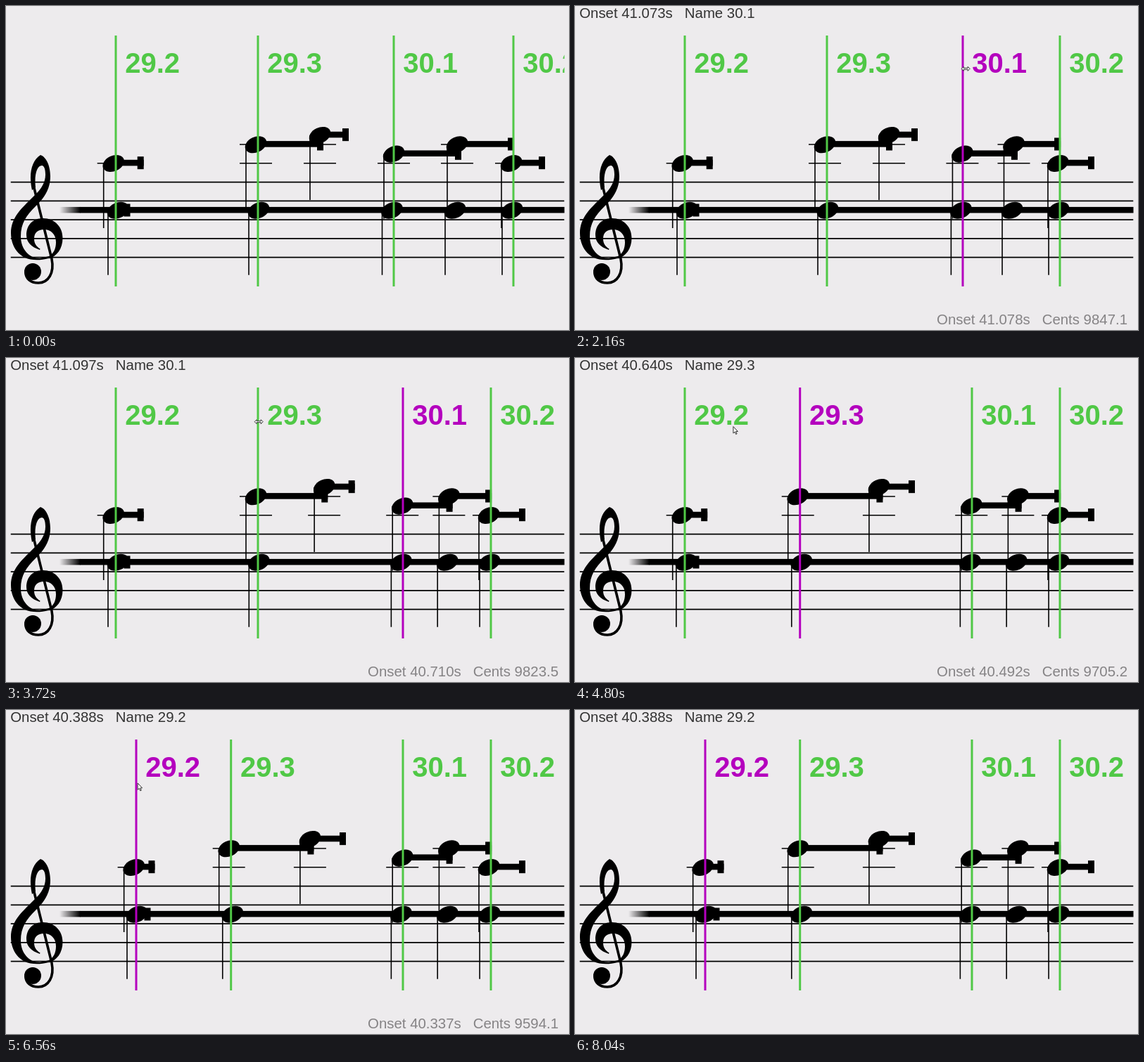
An HTML page that plays this animation: 800 by 461 pixels, repeating every 8080 ms.

```html
<!DOCTYPE html>
<html lang="en">
<head>
<meta charset="utf-8">
<title>Onset editor</title>
<style>
  html, body { margin: 0; width: 100%; height: 100%; overflow: hidden; background: #edebed; }
  svg { display: block; width: 800px; height: 461px; }
  text { font-family: "Liberation Sans", Arial, sans-serif; white-space: pre; }
  .label { font-size: 40px; font-weight: bold; }
  .info { font-size: 20.4px; }
  .thin { stroke: #000; stroke-width: 1.6; }
</style>
</head>
<body>
<svg viewBox="0 0 800 461">
  <defs>
    <clipPath id="view"><rect x="6.5" width="787" height="461"/></clipPath>
    <linearGradient id="fade"><stop offset="0" stop-opacity="0"/><stop offset="1"/></linearGradient>
  </defs>
  <g clip-path="url(#view)">
    <g id="staff"></g>
    <rect x="76" y="285.900" width="29.500" height="8.600" fill="url(#fade)"/>
    <rect x="105" y="285.900" width="690" height="8.600"/>
    <g id="clef">
      <path d="M37 262C32 240 36 220 49 212C58 215 63 229 63 242C63 263 52 275 42 285C29 298 21 309 21 328C21 346 33 359 48 359L61 356V359C22 369 7 345 7 323C7 301 22 288 38 272C49 262 56 252 56 240C56 232 54 227 51 227C44 227 40 240 42 258Z"/>
      <path d="M48 347C36 343 29 336 29 326C29 310 40 302 52 302C70 302 80.500 315 80.500 330C80.500 346 72 356 61 359.500V356C68 352 71 345 71 336C71 325 64 318 54 318C45 318 40 323 40 331C40 338 43 342 48.500 345.500Z"/>
      <path d="M39.500 257L65 360C69 380 60 394 46 394C35 394 28 388 28 379" fill="none" stroke="#000" stroke-width="3.600"/>
      <circle cx="38" cy="378" r="12"/>
    </g>
    <g id="notes"></g>
    <g id="marks"></g>
  </g>
  <text id="top" class="info" x="6.200" y="17" fill="#333"></text>
  <text id="bottom" class="info" x="785" y="453" text-anchor="end" fill="#858385"></text>
  <g id="cursor" fill="#fff" stroke="#333" stroke-linejoin="round">
    <path id="arrow" d="M0 0V9.500L2.200 7.500L3.700 11L5.200 10.300L3.700 7H6.500Z"/>
    <path id="resize" d="M-6 0L-3 -3V-1H3V-3L6 0L3 3V1H-3V3Z"/>
  </g>
</svg>
<script>
const LOOP = 8080, GREEN = '#50c846', PURPLE = '#b400be';
const ENTER = 120, EXIT = 7840, MOVE = 540;
const $ = id => document.getElementById(id);

function set(el, attrs) {
  for (const k in attrs) el.setAttribute(k, attrs[k]);
}
function add(parent, tag, attrs = {}) {
  const el = document.createElementNS('http://www.w3.org/2000/svg', tag);
  set(el, attrs);
  parent.appendChild(el);
  return el;
}
function line(parent, x1, y1, x2, y2) {
  add(parent, 'line', { x1, y1, x2, y2, class: 'thin' });
}
function show(id, on) {
  $(id).style.display = on ? '' : 'none';
}
const mix = (a, b, f) => a + (b - a) * f;
function ease(t, start, length) {
  const f = Math.min(1, Math.max(0, (t - start) / length));
  return f * f * (3 - 2 * f);
}

// Home positions of the onset lines, between fixed outer ends.
const HOME = [0, 156, 358, 551, 721, 1081];
const NAMES = ['', '29.2', '29.3', '30.1', '30.2'];

// The mouse takes line i at (grab, y), pulls it to x = to, and leaves.
const DRAGS = [
  { i: 4, to: 689, grab: 724.65, y: 81.838, press: 760, leave: 1520 },
  { i: 3, to: 564, grab: 553.17, y: 88.636, press: 2120, leave: 2880 },
  { i: 2, to: 319.7, grab: 357.2, y: 90, press: 3740, leave: 4500 },
  { i: 1, to: 185, grab: 157.6, y: 103.26, press: 5240, leave: 6760 }
];
const release = d => d.press + 720;
const pulled = (d, t) => mix(HOME[d.i], d.to, ease(t, d.press + 100, 450));

function linesAt(t) {
  const xs = HOME.slice();
  DRAGS.forEach(d => { xs[d.i] = pulled(d, t); });
  return xs;
}
// The score follows a line only after its release.
function scoreAt(t) {
  const xs = HOME.slice();
  DRAGS.forEach(d => { if (t >= release(d)) xs[d.i] = d.to; });
  return xs;
}
function mouseAt(t) {
  let x = 800, y = 130, leave = ENTER;
  const go = (toX, toY, length) => {
    const e = ease(t, leave, length);
    x = mix(x, toX, e);
    y = mix(y, toY, e ** 1.238); // slightly curved path
  };
  for (const d of DRAGS) {
    go(d.grab, d.y, MOVE);
    x += pulled(d, t) - HOME[d.i];
    leave = d.leave;
  }
  go(800, 88, EXIT - leave);
  return [x, y];
}

// Piecewise linear map between two sets of line positions.
function warp(x, from, to) {
  let i = 1;
  while (i < 5 && x > from[i]) i++;
  return mix(to[i - 1], to[i], (x - from[i - 1]) / (from[i] - from[i - 1]));
}
const seconds = x => (41.073 + (x - 551) / 534.3).toFixed(3);

for (let k = 0; k < 5; k++) line($('staff'), 6.5, 250.6 + 26.75 * k, 793.5, 250.6 + 26.75 * k);

// Notes: onset, steps above the first ledger line, tail length.
const UPPER = [[155.7, 0, 40], [358, 2, 93], [449, 3, 38], [554, 1, 93], [644, 2, 78], [721, 0, 45]];
const LOWER = [162, 362, 551.5, 641, 722].map(x => [x, -5, 0]);

const notes = [...UPPER, ...LOWER].map(([onset, step, tail]) => {
  const y = 224 - 13.35 * step;
  const g = add($('notes'), 'g');
  for (let s = 0; s <= step; s += 2) line(g, -23, 223.7 - 13.35 * s, 23, 223.7 - 13.35 * s);
  line(g, -14, y, -14, y + 92);
  add(g, 'ellipse', { rx: 16, ry: 11, transform: `translate(0 ${y}) rotate(-25)` });
  const note = { onset, tail, g };
  if (tail) {
    note.bar = add($('notes'), 'rect', { y: y - 5.2, height: 8.6 });
    note.cap = add($('notes'), 'rect', { y: y - 9.8, width: 9, height: 18 });
  }
  return note;
});
const stub = add($('notes'), 'rect', { y: 281.5, width: 9, height: 18 });

const marks = [1, 2, 3, 4].map(i => {
  const g = add($('marks'), 'g');
  add(g, 'rect', { x: -1.5, y: 42, width: 3, height: 357 });
  add(g, 'text', { x: 13.2, y: 94.5, class: 'label' }).textContent = NAMES[i];
  return { i, g };
});

function drawScore(score) {
  for (const n of notes) {
    const x = warp(n.onset, HOME, score) - 3;
    set(n.g, { transform: `translate(${x} 0)` });
    if (n.tail) {
      const end = warp(n.onset + n.tail, HOME, score);
      set(n.bar, { x, width: end - x });
      set(n.cap, { x: end - 9 });
    }
  }
  set(stub, { x: score[1] + 11.5 });
}

function drawMouse(t, xs) {
  const inside = t >= ENTER && t < EXIT;
  show('cursor', inside);
  show('bottom', inside);

  // The readout stays still from a press until the mouse leaves.
  const held = DRAGS.find(d => t >= d.press && t < d.leave);
  const readTime = held ? held.press : t;
  const [rx, ry] = mouseAt(readTime);
  const onset = seconds(warp(rx, scoreAt(readTime), HOME));
  const cents = (9823.5 - (ry - 90) * 17.3).toFixed(1);
  $('bottom').textContent = `Onset ${onset}s   Cents ${cents}`;

  const [x, y] = mouseAt(t);
  const idle = held && t >= release(held);
  const onLine = !idle && xs.slice(1, 5).some(lx => Math.abs(x - lx) < 6);
  show('resize', onLine);
  show('arrow', !onLine);
  set($('cursor'), { transform: `translate(${x + (onLine ? 2 : 0.5)} ${y + 0.7})` });
}

function draw(t) {
  const xs = linesAt(t);
  const active = DRAGS.reduce((i, d) => t >= d.press ? d.i : i, 0);
  drawScore(scoreAt(t));
  marks.forEach(({ i, g }) => set(g, {
    transform: `translate(${xs[i]} 0)`,
    fill: i === active ? PURPLE : GREEN
  }));
  $('top').textContent = active ? `Onset ${seconds(xs[active])}s   Name ${NAMES[active]}` : '';
  drawMouse(t, xs);
}

const start = performance.now();
function tick() {
  draw((performance.now() - start) % LOOP);
  requestAnimationFrame(tick);
}
tick();
</script>
</body>
</html>
```
